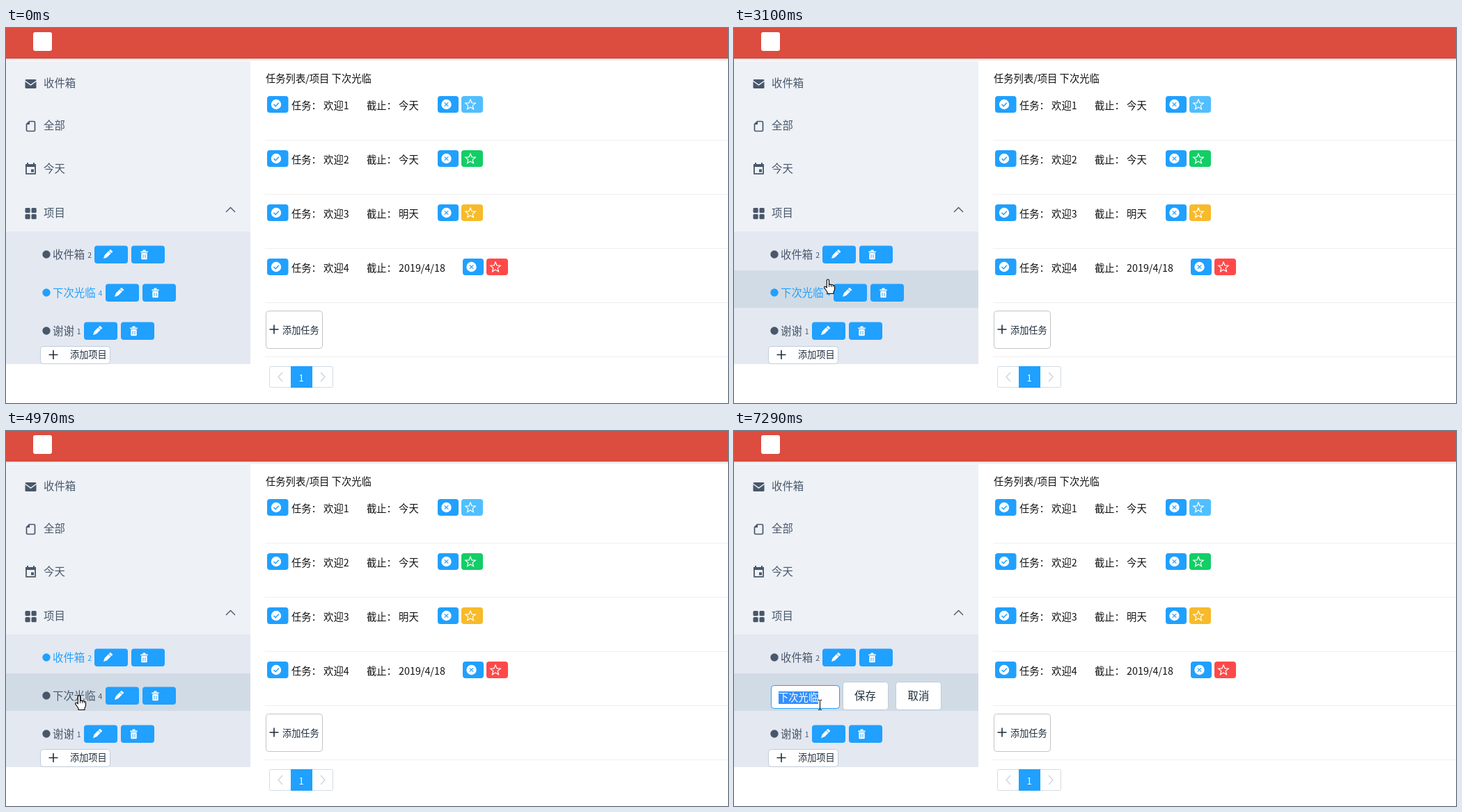
Recreate the animation shown at these times as an HTML page with a canvas. Size 1037 by 540 pixels, loop 8000 ms.

```html
<!DOCTYPE html>
<html lang="zh-CN">
<head>
<meta charset="utf-8">
<style>
html, body { margin: 0; width: 100%; height: 100%; overflow: hidden; background: #fff; }
canvas { display: block; }
</style>
</head>
<body>
<canvas id="stage" width="1037" height="540"></canvas>
<script>
const ctx = document.getElementById('stage').getContext('2d');
const LOOP = 8000;
const FONT = '"Noto Sans CJK SC", "Noto Sans CJK", "Noto Sans", sans-serif';
const BLUE = '#20a0ff', SLATE = '#48576a', INK = '#1f2d3d', LINE = '#c0ccda';
const TEXT = 15.4, SMALL = 14.3;

const STARS = { low: '#50bfff', ok: '#13ce66', mid: '#f7ba2a', high: '#ff4949' };
const PROJECTS = [
  { name: '收件箱', cy: 326, tasks: [['快速开始1', '今天', 'low'], ['快速开始2', '今天', 'low']], count: 2, due: 547, act: 649 },
  { name: '下次光临', cy: 381, tasks: [['欢迎1', '今天', 'low'], ['欢迎2', '今天', 'ok'], ['欢迎3', '明天', 'mid'], ['欢迎4', '2019/4/18', 'high']], count: 4, due: 518, act: 620 },
  { name: '谢谢', cy: 436, count: 1 }
];

// Pointer moves: start, end, steps, from, to
const MOVES = [
  [460, 990, 8, [501, 483], [109, 372]],
  [1390, 1390, 1, [108, 371], [108, 371]],
  [1790, 2170, 6, [123, 386], [168, 383]],
  [3100, 3180, 2, [135, 362], [123, 343]],
  [3330, 3560, 4, [118, 341], [101, 331]],
  [3960, 4270, 5, [103, 362], [105, 381]],
  [5050, 5430, 6, [109, 381], [170, 385]],
  [5810, 6050, 4, [160, 386], [124, 388]],
  [6510, 6740, 4, [124, 388], [39, 384]],
  [6970, 7290, 5, [39, 384], [123, 394]]
];
const PRESSES = [[3810, 3885], [4800, 4970], [5610, 5730], [6510, 6970]];
const HOVERS = [[1, 840, 3100], [0, 3180, 3960], [1, 3960, LOOP]];
const OPEN_INBOX = 3885, OPEN_NEXT = 4970, EDIT = 5730, FOCUS = 6510;

const clamp = v => Math.max(0, Math.min(1, v));
const fade = (t, start) => clamp(Math.floor((t - start) / 77) / 4);
const within = (p, x, y, w, h) => p && p.x >= x && p.x <= x + w && p.y >= y && p.y <= y + h;

function mix(a, b, k) {
  const rgb = h => [1, 3, 5].map(i => parseInt(h.slice(i, i + 2), 16));
  const to = rgb(b);
  return `rgb(${rgb(a).map((v, i) => Math.round(v + (to[i] - v) * k))})`;
}

function pointerAt(t) {
  const move = MOVES.filter(m => t >= m[0]).pop();
  if (!move) return null;
  const [start, end, n, a, b] = move;
  let p = 1;
  if (n > 1) p = Math.min(n - 1, Math.floor((t - start) / (end - start) * (n - 1) + 0.03)) / (n - 1);
  p = 1 - (1 - p) ** 1.5;
  return { x: a[0] + (b[0] - a[0]) * p, y: a[1] + (b[1] - a[1]) * p };
}

function text(s, x, cy, size, color, weight = 400) {
  ctx.font = `${weight} ${size}px ${FONT}`;
  ctx.fillStyle = color;
  ctx.fillText(s, x, cy + size * 0.38);
}

function rect(x, y, w, h, color) {
  ctx.fillStyle = color;
  ctx.fillRect(x, y, w, h);
}

function box(x, y, w, h, r, fill, border) {
  ctx.beginPath();
  ctx.roundRect(x, y, w, h, r);
  ctx.fillStyle = fill;
  ctx.fill();
  if (border) {
    ctx.lineWidth = 1;
    ctx.strokeStyle = border;
    ctx.stroke();
  }
}

function disc(x, y, r, color) {
  ctx.beginPath();
  ctx.arc(x, y, r, 0, Math.PI * 2);
  ctx.fillStyle = color;
  ctx.fill();
}

function stroke(color, width, ...lines) {
  ctx.beginPath();
  for (const pts of lines) {
    for (let i = 0; i < pts.length; i += 2) ctx[i ? 'lineTo' : 'moveTo'](pts[i], pts[i + 1]);
  }
  ctx.strokeStyle = color;
  ctx.lineWidth = width;
  ctx.stroke();
}

function at(x, y, draw) {
  ctx.save();
  ctx.translate(x, y);
  draw();
  ctx.restore();
}

const plus = (x, y, r) => stroke(INK, 1.6, [x - r, y, x + r, y], [x, y - r, x, y + r]);

function pencil(x, y) {
  at(x, y, () => {
    ctx.rotate(Math.PI / 4);
    rect(-2.4, -8, 4.8, 3, '#fff');
    rect(-2.4, -4.2, 4.8, 8.2, '#fff');
    ctx.fill(new Path2D('M-2.4 4H2.4L0 8.5z'));
  });
}

function trash(x, y) {
  at(x, y, () => {
    rect(-5.2, -5, 10.4, 1.8, '#fff');
    rect(-2, -7, 4, 2, '#fff');
    box(-4.2, -2.4, 8.4, 9.2, 1, '#fff');
    stroke(BLUE, 0.9, [-1.5, -0.5, -1.5, 5], [1.5, -0.5, 1.5, 5]);
  });
}

function star(x, y) {
  ctx.beginPath();
  for (let i = 0; i < 10; i++) {
    const a = -Math.PI / 2 + i * Math.PI / 5, r = i % 2 ? 3.4 : 7.6;
    ctx.lineTo(x + r * Math.cos(a), y + 0.6 + r * Math.sin(a));
  }
  ctx.closePath();
  ctx.strokeStyle = '#fff';
  ctx.lineWidth = 1.2;
  ctx.stroke();
}

function menuIcons() {
  // Mail
  box(27.5, 74, 16, 13, 1.5, SLATE);
  stroke('#eef1f6', 1.5, [27, 76, 35.5, 82, 44, 76]);
  // Page
  ctx.strokeStyle = SLATE;
  ctx.lineWidth = 1.7;
  at(29, 134, () => ctx.stroke(new Path2D('M4.5 .5H11q1.5 0 1.5 1.5V13q0 1.5-1.5 1.5H2Q.5 14.5.5 13V4.5z')));
  at(29, 134, () => { ctx.fillStyle = SLATE; ctx.fill(new Path2D('M5 0V5H0z')); });
  // Calendar
  box(28.8, 197, 13.4, 12.8, 1, '#eef1f6', SLATE);
  stroke(SLATE, 1.6, [29, 197, 29, 210, 42, 210, 42, 197]);
  rect(28, 196, 15, 4, SLATE);
  rect(30, 194, 2, 3, SLATE);
  rect(39, 194, 2, 3, SLATE);
  rect(36, 203.5, 4, 4, SLATE);
  // Grid
  for (const x of [27.5, 36.5]) for (const y of [259, 268]) box(x, y, 7.2, 7.2, 1.5, SLATE);
}

function header() {
  const shade = ctx.createLinearGradient(0, 43, 0, 48);
  shade.addColorStop(0, '#d8cfce');
  shade.addColorStop(1, '#ffffff');
  rect(0, 43, 1037, 5, shade);
  rect(0, 0, 1037, 43, '#dc4c3f');
  rect(0, 43, 1037, 1, '#cf4a3e');
  box(39, 6, 27, 27, 3, '#fff');
}

function projectRow(p, active, pointer) {
  const color = mix(SLATE, BLUE, active), end = 67 + TEXT * p.name.length, y = p.cy - 12.5;
  disc(58, p.cy, 5.7, color);
  text(p.name, 67, p.cy, TEXT, color, 300);
  text(p.count, end + 4, p.cy + 1, 10.5, color, 300);
  [14, 67].forEach((dx, i) => {
    const x = Math.round(end + dx);
    box(x, y, 48, 25.5, 4, within(pointer, x, y, 48, 25.5) ? '#4db3ff' : BLUE);
    i ? trash(x + 18.5, p.cy + 0.5) : pencil(x + 19, p.cy);
  });
}

function editRow(t, pointer) {
  const name = PROJECTS[1].name;
  const inField = within(pointer, 53, 366, 99, 34);
  box(53.5, 366.5, 98, 33, 4, '#fff', t >= FOCUS ? BLUE : inField ? '#8391a5' : LINE);
  text(name, 64, 384, SMALL, INK);
  if (t >= FOCUS) {
    const x = t >= 6740 ? 64 : 64 + SMALL * Math.round(4 * clamp((pointer.x - 64) / (4 * SMALL)));
    const w = 64 + SMALL * 4 - x;
    if (w > 0) {
      ctx.save();
      ctx.beginPath();
      ctx.rect(x, 375, w, 18);
      ctx.clip();
      rect(x, 375, w, 18, '#3390ff');
      text(name, 64, 384, SMALL, '#fff');
      ctx.restore();
    }
  }
  [[156, '保存'], [232.5, '取消']].forEach(([x, label]) => {
    const hot = within(pointer, x, 361, 66, 41);
    box(Math.floor(x) + 0.5, 361.5, 65, 40, 4, '#fff', hot ? BLUE : LINE);
    text(label, x + 17, 381, TEXT, hot ? BLUE : INK);
  });
}

function sidebar(t, pointer) {
  rect(0, 48, 351, 245, '#eef1f6');
  rect(0, 293, 351, 191, '#e4e8f1');
  for (const [row, start, end] of HOVERS) {
    ctx.globalAlpha = t < start ? 0 : fade(t, start) * (1 - fade(t, end));
    rect(0, row ? 349 : 293, 351, row ? 54 : 56, '#d1dbe5');
  }
  ctx.globalAlpha = 1;
  menuIcons();
  [['收件箱', 79], ['全部', 140.5], ['今天', 202], ['项目', 266]]
    .forEach(([s, y]) => text(s, 54, y, TEXT, SLATE, 300));
  stroke(SLATE, 1.4, [316, 265, 322.5, 258.5, 329, 265]);

  const inbox = fade(t, OPEN_INBOX) * (1 - fade(t, OPEN_NEXT));
  projectRow(PROJECTS[0], inbox, pointer);
  if (t >= EDIT) editRow(t, pointer);
  else projectRow(PROJECTS[1], 1 - inbox, pointer);
  projectRow(PROJECTS[2], 0, pointer);

  box(49.5, 458.5, 100, 25, 4, '#fff', LINE);
  plus(68, 470.5, 6.5);
  text('添加项目', 92, 470, 13.2, INK);
}

function taskRow(p, [name, due, level], i) {
  const y = Math.round(98 + i * 77.9), cy = y + 12;
  text('任务： ' + name, 410, y + 13.5, SMALL, '#111');
  text('截止： ' + due, p.due, y + 13.5, SMALL, '#111');
  box(375, y, 30.5, 24, 4, BLUE);
  disc(388, cy, 7.2, '#fff');
  stroke(BLUE, 1.5, [384.5, cy, 387.2, cy + 2.7, 391.8, cy - 2.2]);
  const x = p.act + (due.length > 2 ? 36 : 0);
  box(x, y, 30, 24, 4, BLUE);
  disc(x + 12.5, cy, 7.2, '#fff');
  stroke(BLUE, 1.2, [x + 9.8, cy - 2.7, x + 15.2, cy + 2.7], [x + 15.2, cy - 2.7, x + 9.8, cy + 2.7]);
  box(x + 34, y, 31, 24, 4, STARS[level]);
  star(x + 47, cy);
  rect(372, y + 63, 665, 1, '#efefef');
}

function taskList(p) {
  text('任务列表/项目 ' + p.name, 373, 72.5, SMALL, '#111');
  p.tasks.forEach((task, i) => taskRow(p, task, i));
  const y = p.tasks.length > 2 ? 407 : 251;
  box(373.5, y + 0.5, 81, 54, 4, '#fff', '#c4c4c4');
  plus(385, y + 27, 6.5);
  text('添加任务', 397, y + 27.5, 13.2, INK);
  rect(372, y + 66, 665, 1, '#efefef');

  const py = y + 80;
  box(378.5, py + 0.5, 91, 30, 2, '#fff', '#d1dbe5');
  rect(409, py, 31, 31, BLUE);
  text('1', 420.5, py + 17, 13, '#fff');
  stroke('#ccd3dc', 1.3, [397, py + 9, 391, py + 15.5, 397, py + 22], [452, py + 9, 458, py + 15.5, 452, py + 22]);
}

const HAND = new Path2D('M-1.7 12V1.6a1.6 1.6 0 0 1 3.2 0V7.5q1.6-1 3 .3q1.6-.8 2.7.6q2-.3 2.3 1.6V14q0 2-1.5 4V20.5H-1V18.5q-1-2-3-4.5q-2.3-2.6-.8-3.6q1.4-.8 3.1 1.6z');
const ARROW = new Path2D('M0 0V16l3.7-3.4 2.4 5.6 2.4-1-2.4-5.5H11z');

function cursor(t, p) {
  const pressed = PRESSES.some(([a, b]) => t >= a && t < b);
  if (pressed) disc(p.x, p.y, 13.3, 'rgba(255,255,0,.47)');
  const beam = t >= EDIT && (within(p, 53, 366, 99, 34) || t >= FOCUS && pressed);
  at(Math.round(p.x), Math.round(p.y), () => {
    if (beam) {
      stroke('#000', 1, [-2, -6.5, 0, -6.5], [1, -6.5, 3, -6.5], [0.5, -6, 0.5, 7], [-2, 7.5, 0, 7.5], [1, 7.5, 3, 7.5]);
      return;
    }
    const shape = within(p, 0, 293, 351, 165) ? HAND : ARROW;
    ctx.fillStyle = '#fff';
    ctx.strokeStyle = '#000';
    ctx.lineWidth = 1.1;
    ctx.lineJoin = 'round';
    ctx.fill(shape);
    ctx.stroke(shape);
    if (shape === HAND) stroke('#000', 0.9, [1.5, 7.5, 1.5, 11], [4.5, 8, 4.5, 11], [7.2, 8.6, 7.2, 11]);
  });
}

function frame(now) {
  const t = now % LOOP, pointer = pointerAt(t);
  rect(0, 0, 1037, 540, '#fff');
  header();
  sidebar(t, pointer);
  taskList(PROJECTS[t >= OPEN_INBOX && t < OPEN_NEXT ? 0 : 1]);
  if (pointer) cursor(t, pointer);
}

const begin = performance.now();
(function tick() {
  frame(performance.now() - begin);
  requestAnimationFrame(tick);
})();
</script>
</body>
</html>
```
